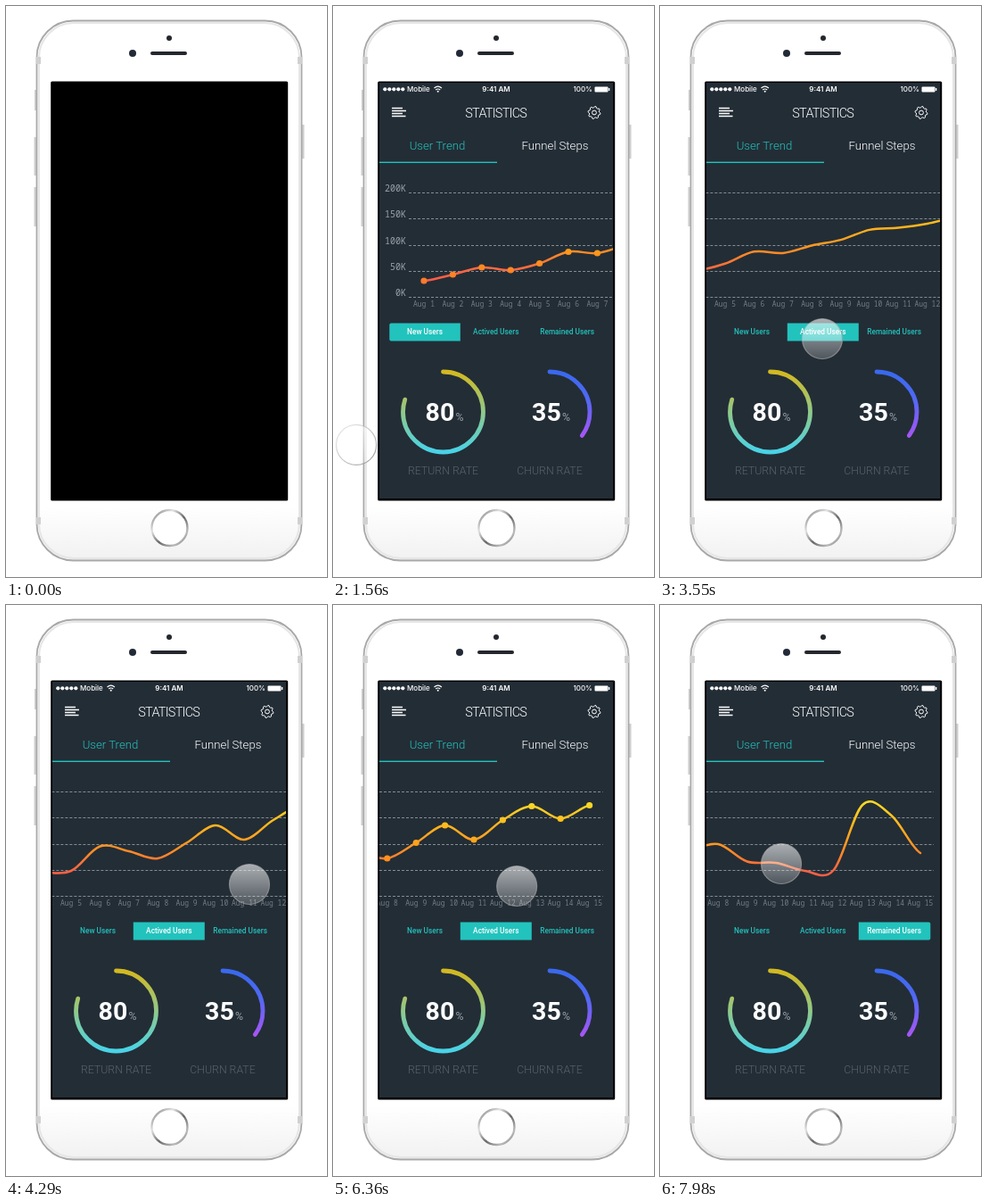
Animation of 360 by 640 pixels, one loop 8000 ms. Source, as an HTML page:

```html
<!DOCTYPE html>
<html lang="en">
<head>
<meta charset="utf-8">
<title>Statistics</title>
<style>
html, body { margin: 0; width: 100%; height: 100%; overflow: hidden; background: #fff; }
svg { display: block; width: 100vw; height: 100vh; }
text { font-family: Roboto, "Open Sans", sans-serif; fill: #fff; }
.mid { text-anchor: middle; }
.bar { font: 500 8px Inter, "Liberation Sans", sans-serif; }
.head { font-size: 14.5px; font-weight: 300; letter-spacing: -.75px; }
.tab { font-size: 13.2px; font-weight: 300; }
.mono { font-family: "Noto Sans Mono", "DejaVu Sans Mono", monospace; }
.value { font-size: 10px; fill: #98a0a7; text-anchor: end; }
.day { font-size: 8px; fill: #737c84; text-anchor: middle; }
.button { font-size: 8.3px; font-weight: 500; fill: #22c3bd; text-anchor: middle; }
.count { font-size: 28.5px; font-weight: 700; text-anchor: middle; }
.percent { font-size: 12.3px; fill: #9aa1a8; }
.rate { font-size: 12.3px; font-weight: 300; fill: #59626b; text-anchor: middle; }
.teal { fill: #22c3bd; }
</style>
</head>
<body>
<svg viewBox="0 0 360 640">
  <defs>
    <linearGradient id="body" x1="0" y1="0" x2="0" y2="1">
      <stop offset="0" stop-color="#fff"/><stop offset=".9" stop-color="#fff"/>
      <stop offset="1" stop-color="#f1f1f1"/>
    </linearGradient>
    <linearGradient id="home" x1="0" y1="0" x2="1" y2="1">
      <stop offset="0" stop-color="#777"/><stop offset=".3" stop-color="#e2e2e2"/>
      <stop offset=".55" stop-color="#666"/><stop offset=".8" stop-color="#bbb"/>
      <stop offset="1" stop-color="#777"/>
    </linearGradient>
    <linearGradient id="heat" gradientUnits="userSpaceOnUse" x1="0" y1="308" x2="0" y2="222">
      <stop offset="0" stop-color="#ff5a48"/><stop offset=".12" stop-color="#ff6442"/>
      <stop offset=".36" stop-color="#ff8a26"/><stop offset=".67" stop-color="#ffb01c"/>
      <stop offset="1" stop-color="#fbd824"/>
    </linearGradient>
    <linearGradient id="glow" gradientUnits="userSpaceOnUse" x1="0" y1="308" x2="0" y2="222">
      <stop offset="0" stop-color="#ff7a2c"/><stop offset=".36" stop-color="#ff9618"/>
      <stop offset="1" stop-color="#fbd824"/>
    </linearGradient>
    <linearGradient id="warm" gradientUnits="userSpaceOnUse" x1="0" y1="410" x2="0" y2="500">
      <stop offset="0" stop-color="#d3b91f"/><stop offset=".5" stop-color="#90c98a"/>
      <stop offset="1" stop-color="#48d3e8"/>
    </linearGradient>
    <linearGradient id="cool" gradientUnits="userSpaceOnUse" x1="0" y1="412" x2="0" y2="484">
      <stop offset="0" stop-color="#3a69ee"/><stop offset=".4" stop-color="#5268f4"/>
      <stop offset="1" stop-color="#aa55f5"/>
    </linearGradient>
    <linearGradient id="glass" x1="0" y1="0" x2="0" y2="1">
      <stop offset="0" stop-color="#fff" stop-opacity=".62"/>
      <stop offset="1" stop-color="#fff" stop-opacity=".2"/>
    </linearGradient>
    <linearGradient id="rim" x1="0" y1="0" x2="1" y2="1">
      <stop offset="0" stop-color="#ccc" stop-opacity=".4"/>
      <stop offset="1" stop-color="#8c8c8c" stop-opacity=".9"/>
    </linearGradient>
    <clipPath id="screen"><rect x="52" y="86" width="262" height="466"/></clipPath>
    <clipPath id="reveal"><rect id="wipe" x="80" y="190" width="0" height="145"/></clipPath>
  </defs>

  <path d="M32 94h2.500v23h-2.500zM31.500 147h3v43h-3zM31.500 203h3v44h-3zM332 133h2.500v38h-2.500z" fill="#cfcfcf"/>
  <rect x="34.500" y="16.500" width="297" height="605" rx="41" fill="url(#body)" stroke="#a8a8a8" stroke-width="1.800"/>
  <rect x="37" y="19" width="292" height="600" rx="39" fill="none" stroke="#e6e6e6" stroke-width="2"/>
  <path d="M34 57h5v8h-5zM327 57h5v8h-5zM34 573h5v8h-5zM327 573h5v8h-5z" fill="#d0d0d0"/>
  <circle cx="183" cy="36" r="3" fill="#24272d"/>
  <circle cx="142" cy="53" r="4" fill="#222a38"/>
  <rect x="162" y="51" width="41" height="4" rx="2" fill="#24272d"/>
  <circle cx="183.500" cy="585" r="20" fill="#fff" stroke="url(#home)" stroke-width="2.300"/>
  <rect x="50.200" y="84.500" width="266" height="470" rx="1.500"/>

  <g id="ui" clip-path="url(#screen)" opacity="0">
    <rect x="52" y="86" width="262" height="466" fill="#232d36"/>
    <g id="signal" fill="#fff"></g>
    <text class="bar" x="83" y="96">Mobile</text>
    <path d="M113.500 92q4.200-3.600 8.400 0M115.200 94q2.500-2 5 0" fill="none" stroke="#fff" stroke-width="1.200"/>
    <circle cx="117.700" cy="95.700" r="1" fill="#fff"/>
    <text class="bar mid" x="183" y="96" style="font-weight:600">9:41 AM</text>
    <text class="bar" x="291" y="96" text-anchor="end">100%</text>
    <rect x="293.500" y="90.500" width="15" height="6" rx="1" fill="#fff"/>
    <rect x="309" y="92" width="1.300" height="3" fill="#fff"/>

    <path d="M66 114.500h12M66 117.500h16M66 120.500h12M66 123.500h15.500" stroke="#fff" stroke-width="1.300"/>
    <text class="head mid" x="182.700" y="125">STATISTICS</text>
    <g fill="none" stroke="#fff" stroke-linejoin="round">
      <path id="gear"/><circle cx="293" cy="119.500" r="2.400"/>
    </g>
    <text class="tab mid teal" x="117" y="161">User Trend</text>
    <text class="tab mid" x="249" y="161">Funnel Steps</text>
    <rect class="teal" x="52" y="174.600" width="132" height="1.400"/>

    <g id="chart">
      <g id="grid" stroke="#fff" stroke-opacity=".45" stroke-dasharray="3 2"></g>
      <g id="axes"></g>
      <g clip-path="url(#reveal)">
        <path id="line" fill="none" stroke="url(#heat)" stroke-width="2.500" stroke-linecap="round"/>
      </g>
      <path id="dots" fill="url(#glow)"/>
    </g>

    <path id="pick" class="teal" transform="translate(.3 .4)"/>
    <g id="buttons"></g>
    <g id="rings"></g>
  </g>

  <circle id="touch" r="22.500" fill="url(#glass)" stroke="url(#rim)" stroke-width="1.200"/>
</svg>
<script>
const NS = "http://www.w3.org/2000/svg";
const LOOP = 8000, STEP = 32.4, FIRST = 102;
const $ = id => document.getElementById(id);

function add(parent, tag, attrs, text) {
  const el = document.createElementNS(NS, tag);
  for (const k in attrs) el.setAttribute(k, attrs[k]);
  if (text !== undefined) el.textContent = text;
  $(parent).appendChild(el);
  return el;
}
const ramp = (t, a, b) => Math.min(1, Math.max(0, (t - a) / (b - a)));
const ease = u => u * u * (3 - 2 * u);

// Smooth curve through [time, value] keys that never overshoots them.
function track(keys, t) {
  const n = keys.length - 1;
  if (t <= keys[0][0]) return keys[0][1];
  if (t >= keys[n][0]) return keys[n][1];
  const rate = i => (keys[i + 1][1] - keys[i][1]) / (keys[i + 1][0] - keys[i][0]);
  const slope = i => {
    if (i === 0 || i === n) return rate(i ? n - 1 : 0);
    const a = rate(i - 1), b = rate(i);
    return a * b <= 0 ? 0 : 2 * a * b / (a + b);
  };
  let i = 0;
  while (t > keys[i + 1][0]) i++;
  const [t0, v0] = keys[i], [t1, v1] = keys[i + 1];
  const d = t1 - t0, u = (t - t0) / d, w = 1 - u;
  return v0 * w * w * (1 + 2 * u) + v1 * u * u * (3 - 2 * u)
    + d * u * w * (w * slope(i) - u * slope(i + 1));
}

const series = [
  [308, 301, 293, 296, 288.5, 275.5, 277, 268, 262, 251, 248, 244, 237, 232, 224],
  [306, 302, 304, 300, 298, 270.5, 276, 284, 266.5, 247, 263, 241, 225.5, 239.5, 224.5],
  [300, 292, 296, 284, 288, 280, 275, 268, 287.5, 289, 298, 297, 224, 236, 278]
];
const touchX = [[1100, -24], [1560, 26], [1740, 50], [2250, 276], [2450, 274], [2790, 188],
  [3050, 120], [3400, 182], [3560, 182], [4290, 273], [5000, 273], [5370, 244], [5990, 177],
  [6130, 169], [6360, 206], [6800, 263], [7350, 263], [7700, 240], [7980, 136]];
const touchY = [[1100, 519], [1560, 492], [1740, 471], [2300, 318], [2450, 318], [2790, 331],
  [3050, 342], [3400, 373], [3560, 373], [4290, 313], [5060, 369], [5370, 371], [5700, 376],
  [5990, 368], [6360, 315], [6800, 367], [7350, 367], [7700, 353], [7980, 290]];
const scroll = [[2450, 0], [2790, -87.7], [3050, -151], [3300, -158.6], [5000, -158.6],
  [5370, -189], [5990, -256], [6150, -268.5], [6360, -268], [6750, -263.6]];
const picks = [3480, 7250];
const MORPH = 680;

// Static parts
for (let i = 0; i < 5; i++) add("signal", "circle", { cx: 58.3 + i * 5, cy: 93.3, r: 2.1 });

let gear = "";
for (let i = 0; i < 32; i++) {
  const a = (i + .5) * Math.PI / 16, r = i % 4 < 2 ? 7 : 5.6;
  gear += (i ? "L" : "M") + (293 + r * Math.sin(a)).toFixed(2) + " " + (119.5 - r * Math.cos(a)).toFixed(2);
}
$("gear").setAttribute("d", gear + "Z");

["200K", "150K", "100K", "50K", "0K"].forEach((name, i) => {
  const y = Math.round(209 + i * 29.25) + .5;
  add("grid", "line", { x1: 85, x2: 570.6, y1: y, y2: y });
  add("axes", "text", { class: "mono value", x: 82, y: y - 1.5 }, name);
});
for (let i = 0; i < 15; i++)
  add("axes", "text", { class: "mono day", x: FIRST + i * STEP, y: 337 }, "Aug " + (i + 1));

const buttons = ["New Users", "Actived Users", "Remained Users"].map((name, i) =>
  add("buttons", "text", { class: "button", x: 103 + i * 79.8, y: 368 }, name));
const pickShapes = [
  "M65 355H142.500V375H65Q63 375 63 373V357Q63 355 65 355Z",
  "M142.500 355H222.500V375H142.500Z",
  "M222.500 355H301Q303 355 303 357V373Q303 375 301 375H222.500Z"
];

const rings = [[123.5, 80, "warm", "RETURN RATE"], [243, 35, "cool", "CHURN RATE"]].map(([x, value, paint, name]) => {
  const arc = add("rings", "path", {
    d: `M${x} 410a45 45 0 0 1 0 90a45 45 0 0 1 0 -90`, pathLength: 100,
    fill: "none", stroke: `url(#${paint})`, "stroke-width": 4.8, "stroke-linecap": "round"
  });
  const count = add("rings", "text", { class: "count", x: x - 3.6, y: 465 });
  add("rings", "text", { class: "percent", x: x + 14, y: 465 }, "%");
  add("rings", "text", { class: "rate", x, y: 525 }, name);
  return { arc, count, value };
});

// Moving parts
function heights(t) {
  const k = t < picks[1] ? 0 : 1;
  const u = ease(ramp(t, picks[k], picks[k] + MORPH));
  return series[k].map((y, i) => y + (series[k + 1][i] - y) * u);
}

function curve(ys) {
  const at = i => ys[Math.min(ys.length - 1, Math.max(0, i))];
  let d = `M${FIRST} ${ys[0]}`;
  for (let i = 0; i < ys.length - 1; i++) {
    const x = FIRST + i * STEP;
    const c1 = at(i) + (at(i + 1) - at(i - 1)) / 6;
    const c2 = at(i + 1) - (at(i + 2) - at(i)) / 6;
    d += `C${x + STEP / 3} ${c1} ${x + STEP * 2 / 3} ${c2} ${x + STEP} ${at(i + 1)}`;
  }
  return d;
}

function dots(ys, t) {
  return ys.map((y, i) => {
    let s = ramp(t, 1050 + i * 60, 1150 + i * 60);
    if (t >= picks[0]) s = ramp(t, 4350, 4550);
    if (t >= picks[1]) s = 0;
    const r = 3.6 * s, x = FIRST + i * STEP;
    return s ? `M${x - r} ${y}a${r} ${r} 0 1 0 ${2 * r} 0a${r} ${r} 0 1 0 ${-2 * r} 0` : "";
  }).join("");
}

function draw(t) {
  $("ui").setAttribute("opacity", ramp(t, 270, 850));

  const ys = heights(t);
  $("chart").setAttribute("transform", `translate(${track(scroll, t)} 0)`);
  $("line").setAttribute("d", curve(ys));
  $("dots").setAttribute("d", dots(ys, t));
  const drawn = ramp(t, 960, 1500);
  $("wipe").setAttribute("width", drawn < 1 ? 235 * ease(drawn) : 500);

  const chosen = picks.filter(p => t >= p).length;
  $("pick").setAttribute("d", pickShapes[chosen]);
  buttons.forEach((b, i) => b.style.fill = i === chosen ? "#fff" : "");

  const grown = ease(ramp(t, 930, 1500));
  for (const { arc, count, value } of rings) {
    arc.setAttribute("stroke-dasharray", `${value * grown} 200`);
    arc.setAttribute("visibility", grown ? "visible" : "hidden");
    count.textContent = Math.round(value * grown);
  }

  $("touch").setAttribute("transform", `translate(${track(touchX, t)} ${track(touchY, t)})`);
}

const start = performance.now();
function tick() {
  draw((performance.now() - start) % LOOP);
  requestAnimationFrame(tick);
}
draw(0);
requestAnimationFrame(tick);
</script>
</body>
</html>
```
